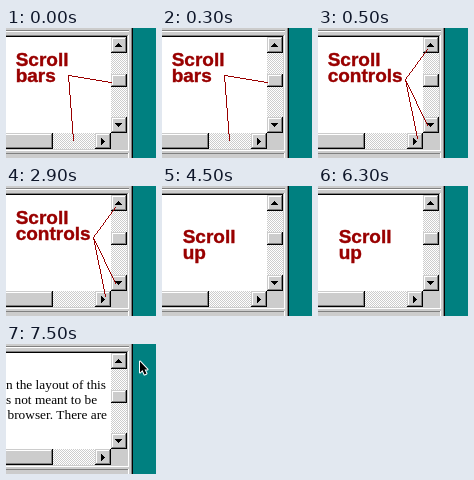
An HTML page with a canvas for the animation above (8000 ms loop, 150 by 130 pixels).

```html
<!DOCTYPE html>
<html lang="en">
<head>
<meta charset="utf-8">
<title>Scroll bars</title>
<style>
html, body { margin: 0; width: 100%; height: 100%; overflow: hidden; background: #008080; }
canvas { display: block; }
</style>
</head>
<body>
<canvas id="stage" width="150" height="130"></canvas>
<script>
const ctx = document.getElementById('stage').getContext('2d');
const GRAY = '#cccccc', SHADE = '#808080', RED = '#990000';
const LOOP = 8000;

function rect(color, x, y, w, h) {
  ctx.fillStyle = color;
  ctx.fillRect(x, y, w, h);
}

function bevel(x, y, w, h) {
  rect('#000', x, y, w, h);
  rect(GRAY, x, y, w - 1, h - 1);
  rect(SHADE, x + 1, y + 1, w - 2, h - 2);
  rect('#fff', x + 1, y + 1, w - 3, h - 3);
  rect(GRAY, x + 2, y + 2, w - 4, h - 4);
}

// A stepped triangle, growing away from its tip in direction (dx, dy).
function arrow(x, y, dx, dy) {
  for (let i = 0; i < 4; i++) {
    const size = 2 * i + 1;
    rect('#000', x + dx * i - (dx ? 0 : i), y + dy * i - (dy ? 0 : i),
      dx ? 1 : size, dy ? 1 : size);
  }
}

function track(x, y, w, h) {
  rect(GRAY, x, y, w, h);
  for (let row = y; row < y + h; row++)
    for (let col = x + (x + row + 1) % 2; col < x + w; col += 2) rect('#fff', col, row, 1, 1);
}

function drawWindow() {
  rect('#008080', 0, 0, 150, 130);
  rect(GRAY, 0, 0, 127, 130);
  rect(SHADE, 125, 0, 1, 130);
  rect('#000', 126, 0, 1, 130);

  rect(SHADE, 0, 2, 123, 1);
  rect('#fff', 0, 3, 123, 1);
  rect(SHADE, 0, 7, 122, 1);
  rect('#000', 0, 8, 121, 1);
  rect('#fff', 0, 9, 105, 96);

  track(105, 9, 16, 96);
  bevel(105, 9, 16, 16);
  arrow(112, 15, 0, 1);
  bevel(105, 46, 16, 13);
  bevel(105, 89, 16, 16);
  arrow(112, 98, 0, -1);

  track(0, 105, 105, 16);
  bevel(-3, 105, 50, 16);
  bevel(89, 105, 16, 16);
  arrow(98, 113, -1, 0);
  rect(GRAY, 105, 105, 16, 16);

  rect('#fff', 122, 7, 1, 116);
  rect('#fff', 0, 122, 123, 1);
  rect(SHADE, 0, 125, 122, 1);
  rect('#fff', 122, 125, 1, 5);
}

function label(first, second, x, y) {
  ctx.font = 'bold 19px "Liberation Sans", Arial, sans-serif';
  ctx.fillStyle = ctx.strokeStyle = RED;
  ctx.lineWidth = 0.4;
  [first, second].forEach((word, i) => {
    ctx.fillText(word, x, y + 16 * i);
    ctx.strokeText(word, x, y + 16 * i);
  });
}

function paragraph(lines) {
  ctx.font = '13.33px "Liberation Serif", "Times New Roman", serif';
  ctx.fillStyle = '#000';
  for (const [words, x, y] of lines) ctx.fillText(words, x, y);
}

// Hard-edged lines, one pixel per step.
function pointers(x, y, ends) {
  for (const [endX, endY] of ends) {
    const dx = endX - x, dy = endY - y;
    const steps = Math.max(Math.abs(dx), Math.abs(dy));
    for (let i = 0; i <= steps; i++)
      rect(RED, Math.round(x + dx * i / steps), Math.round(y + dy * i / steps), 1, 1);
  }
}

function cursor(x, y) {
  const shape = new Path2D(`M${x} ${y}v11l2.5-2.5 2 4.5 2-1-2-4h3z`);
  ctx.lineWidth = 2;
  ctx.lineJoin = 'round';
  ctx.strokeStyle = '#fff';
  ctx.stroke(shape);
  ctx.fillStyle = '#000';
  ctx.fill(shape);
}

function draw(time) {
  drawWindow();
  if (time < 500) {
    label('Scroll', 'bars', 9.7, 38);
    pointers(62, 47, [[105, 54], [67, 112]]);
  } else if (time < 4500) {
    label('Scroll', 'controls', 9.7, 38);
    pointers(87, 51, [[109, 21], [109, 97], [99, 110]]);
  } else if (time < 7500) {
    label('Scroll', 'up', 20.7, 57);
  } else {
    paragraph([
      ['n the layout of this', 0, 45],
      ['s not meant to be', 0, 60],
      ['browser. There are', 1.5, 75]
    ]);
    cursor(134, 17.5);
  }
}

function tick() {
  draw(performance.now() % LOOP);
  requestAnimationFrame(tick);
}
tick();
</script>
</body>
</html>
```
